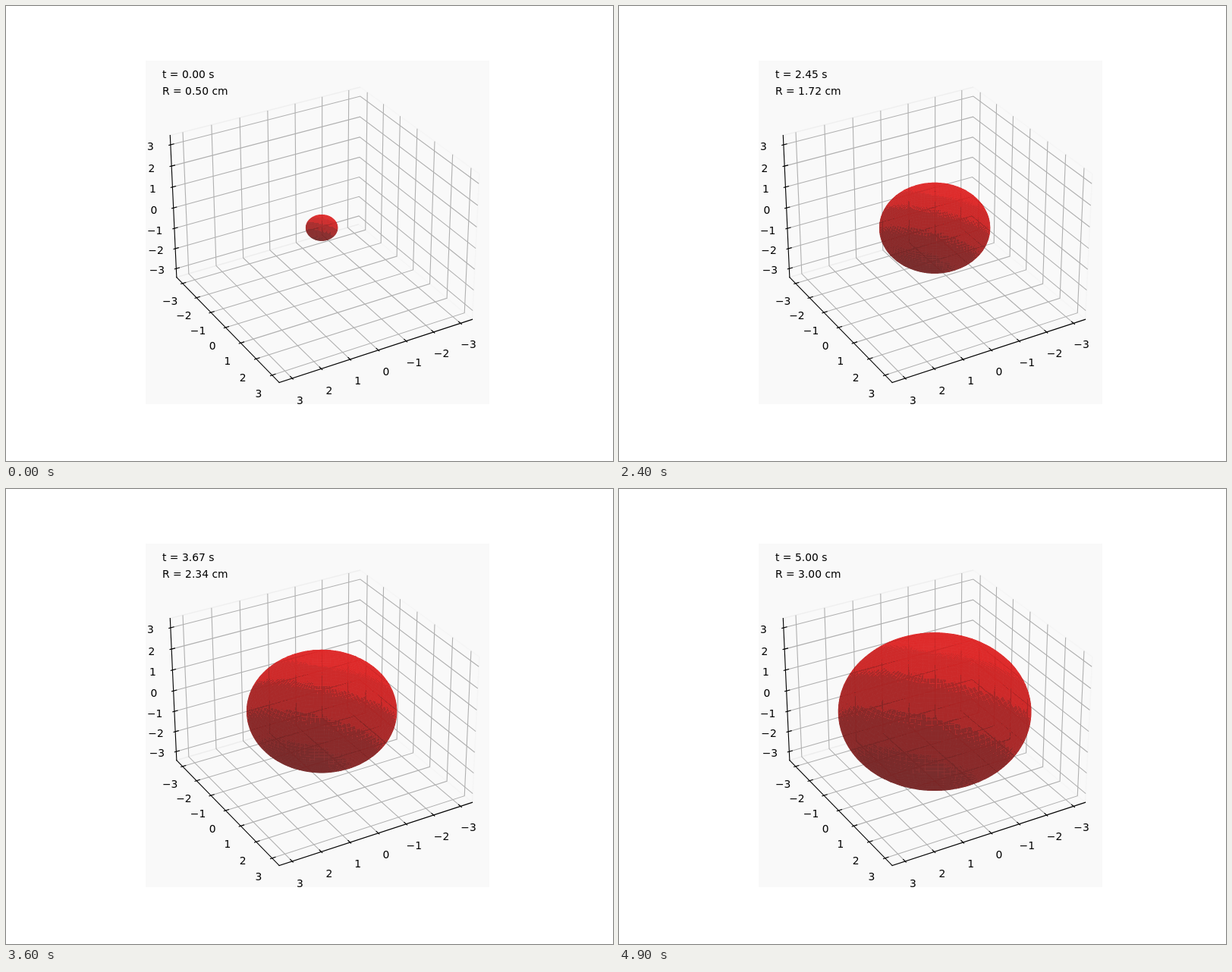
Animation of 800x600 px, one loop 5 s. Source, as an HTML page with a canvas:

```html
<!DOCTYPE html>
<html lang="en">
<head>
<meta charset="utf-8">
<title>Growing sphere</title>
<style>
  html, body { margin: 0; width: 100%; height: 100%; overflow: hidden; background: #fff; }
  canvas, svg { position: absolute; left: 0; top: 0; width: 800px; height: 600px; }
  text { font: 13.89px "DejaVu Sans", sans-serif; fill: #000; white-space: pre; }
  .tick { text-anchor: middle; }
</style>
</head>
<body>
<canvas id="plot" width="800" height="600"></canvas>
<svg id="labels" viewBox="0 0 800 600">
  <text id="time" x="206" y="95"></text>
  <text id="radius" x="206" y="117"></text>
</svg>
<script>
const STEPS = 50, STEP_MS = 100, DURATION = 5;
const LIM = 3.4375;                 // half size of the axes box, data units
const DELTA = 0.55;                 // base length for ticks and label offsets
const TICKS = [-3, -2, -1, 0, 1, 2, 3];
const SCALE_XY = 0.5953 / LIM, SCALE_Z = 0.4465 / LIM;
const AZIM = Math.PI / 3, ELEV = Math.PI / 6, DIST = 10;
const ZOOM = 453 / 0.185, CX = 416.12, CY = 292.38;
const ALPHA = 0.6, NU = 99, NV = 49;
const LIGHT = [-2 / 3, -2 / 3, 1 / 3];

const ca = Math.cos(AZIM), sa = Math.sin(AZIM);
const ce = Math.cos(ELEV), se = Math.sin(ELEV);
const ctx = document.getElementById('plot').getContext('2d', { willReadFrequently: true });
const labels = document.getElementById('labels');
const timeText = document.getElementById('time');
const radiusText = document.getElementById('radius');

function project([x, y, z]) {
  x *= SCALE_XY; y *= SCALE_XY; z *= SCALE_Z;
  const near = x * ca + y * sa;
  const k = ZOOM / (DIST - near * ce - z * se);
  return [CX + (y * ca - x * sa) * k, CY - (z * ce - near * se) * k];
}

function line(points, color, width, cap = 'butt') {
  ctx.beginPath();
  points.forEach(p => ctx.lineTo(...project(p)));
  ctx.strokeStyle = color;
  ctx.lineWidth = width;
  ctx.lineCap = cap;
  ctx.stroke();
}

function addLabel(value, pos) {
  const [x, y] = project(pos);
  const el = document.createElementNS('http://www.w3.org/2000/svg', 'text');
  el.setAttribute('class', 'tick');
  el.setAttribute('x', x.toFixed(1));
  el.setAttribute('y', Math.round(y + 10.8));
  el.textContent = String(value).replace('-', '\u2212');
  labels.append(el);
}

function drawAxes() {
  const L = LIM, black = '#000', grid = '#b0b0b0', w = 1.11;
  const tOut = L + 0.1 * DELTA, tIn = L - 0.2 * DELTA;
  ctx.fillStyle = '#fff';
  ctx.fillRect(0, 0, 800, 600);
  ctx.fillStyle = '#f9f9f9';
  ctx.fillRect(184, 72, 453, 453);

  line([[-L, -L, -L], [-L, L, -L], [-L, L, L], [-L, -L, L]], 'rgba(242,242,242,.5)', 1.39);
  line([[-L, -L, -L], [L, -L, -L], [L, -L, L], [-L, -L, L]], 'rgba(230,230,230,.5)', 1.39);
  line([[-L, -L, -L], [L, -L, -L], [L, L, -L], [-L, L, -L]], 'rgba(236,236,236,.5)', 1.39);

  for (const t of TICKS) {
    line([[t, L, -L], [t, -L, -L], [t, -L, L]], grid, w);
    line([[L, t, -L], [-L, t, -L], [-L, t, L]], grid, w);
    line([[L, -L, t], [-L, -L, t], [-L, L, t]], grid, w);
  }
  line([[L, L, -L], [-L, L, -L]], black, w, 'square');
  line([[L, L, -L], [L, -L, -L]], black, w, 'square');
  line([[L, -L, -L], [L, -L, L]], black, w, 'square');
  for (const t of TICKS) {
    line([[t, tOut, -L], [t, tIn, -L]], black, w, 'square');
    line([[tOut, t, -L], [tIn, t, -L]], black, w, 'square');
    line([[tOut, -L, t], [tIn, -L, t]], black, w, 'square');
  }
}

function unit(i, j) {
  const u = 2 * Math.PI * i / NU, v = Math.PI * j / NV;
  return [Math.cos(u) * Math.sin(v), Math.sin(u) * Math.sin(v), Math.cos(v)];
}

function drawSphere(r) {
  const pts = [];
  for (let i = 0; i <= NU; i++) {
    pts.push([]);
    for (let j = 0; j <= NV; j++) pts[i].push(project(unit(i, j).map(c => c * r)));
  }
  const back = [], front = [];
  for (let i = 0; i < NU; i++) {
    for (let j = 0; j < NV; j++) {
      const q = [pts[i][j], pts[i][j + 1], pts[i + 1][j + 1], pts[i + 1][j]];
      const area = (q[2][0] - q[0][0]) * (q[3][1] - q[1][1])
                 - (q[2][1] - q[0][1]) * (q[3][0] - q[1][0]);
      const n = unit(i + 0.5, j + 0.5);
      const s = n[0] * LIGHT[0] + n[1] * LIGHT[1] + n[2] * LIGHT[2];
      const red = Math.round(255 * (0.65 + 0.35 * s));
      (area < 0 ? front : back).push({ q, red });
    }
  }
  for (const { q, red } of back.concat(front)) {
    ctx.fillStyle = `rgba(${red},0,0,${ALPHA})`;
    ctx.beginPath();
    q.forEach(p => ctx.lineTo(p[0], p[1]));
    ctx.fill();
  }
}

// Reduce the shading to a few flat bands.
function band(red) {
  return red > 215 ? 222 : red > 188 ? 206 : red > 156 ? 170 : red > 129 ? 138 : 122;
}

function posterize(r) {
  const w = Math.ceil(r * 43) + 4, h = Math.ceil(r * 36) + 4;
  const x = Math.round(CX) - w, y = Math.round(CY) - h;
  const img = ctx.getImageData(x, y, 2 * w, 2 * h), d = img.data;
  for (let i = 0; i < d.length; i += 4) {
    if (d[i] - d[i + 1] < 50 || d[i + 1] > 100) continue;
    d[i] = band(d[i]);
    d[i + 1] = d[i + 2] = 41 + (d[i + 1] - 41) * 0.4;
  }
  ctx.putImageData(img, x, y);
}

function draw(step) {
  const t = DURATION * step / (STEPS - 1), r = 0.5 + 0.5 * t;
  drawAxes();
  drawSphere(r);
  posterize(r);
  timeText.textContent = `t = ${t.toFixed(2)} s`;
  radiusText.textContent = `R = ${r.toFixed(2)} cm`;
}

const OFF = LIM + 0.4655;
for (const t of TICKS) {
  addLabel(t, [t, OFF, -OFF]);
  addLabel(t, [OFF, t, -OFF]);
  addLabel(t, [OFF, -OFF, t]);
}

let shown = -1;
const start = performance.now();
function tick() {
  const step = Math.floor((performance.now() - start) / STEP_MS) % STEPS;
  if (step !== shown) draw(shown = step);
  requestAnimationFrame(tick);
}
tick();
</script>
</body>
</html>
```
